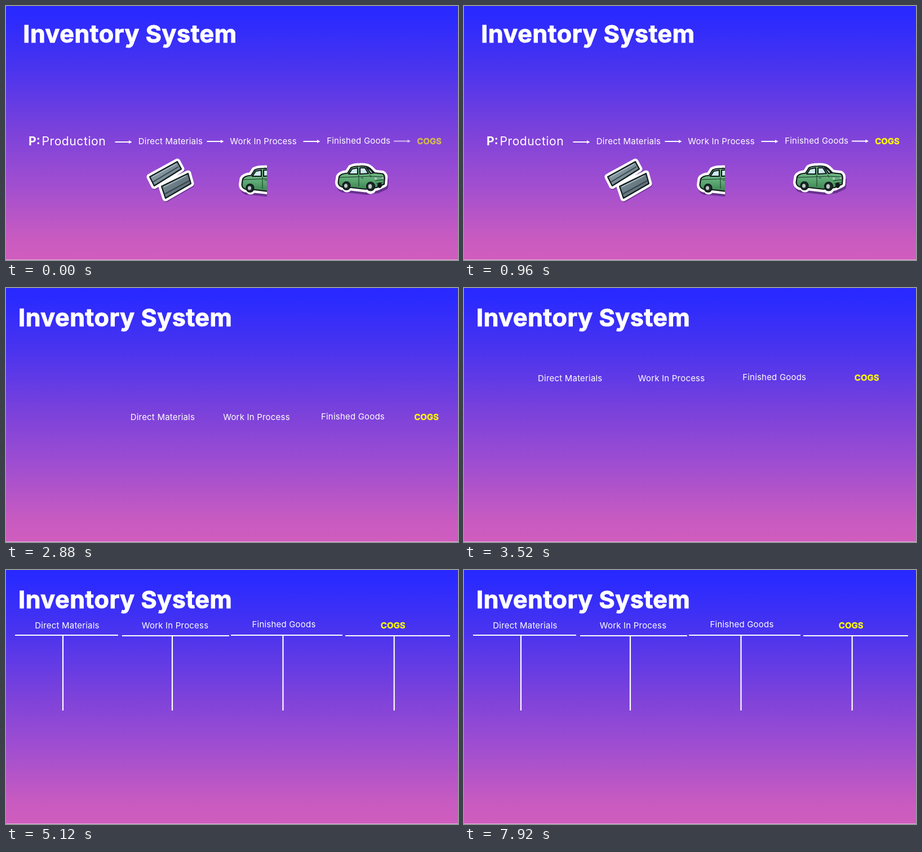
These frames come from a looping animation (802x452 px, 8 s). An HTML page:

```html
<!DOCTYPE html>
<html lang="en">
<head>
<meta charset="utf-8">
<title>Inventory System</title>
<style>
  html, body { margin: 0; width: 100%; height: 100%; overflow: hidden; background: #2829ff; }
  svg { display: block; width: 100%; height: 100%; }
  text { font-family: Inter, "Open Sans", sans-serif; font-size: 15px; fill: #fff; text-anchor: middle; }
  .label { letter-spacing: .2px; }
  .title { font-size: 43px; font-weight: 700; letter-spacing: .6px; stroke: #fff; stroke-width: 1.1; }
  .production { font-size: 21.2px; letter-spacing: .5px; text-anchor: start; }
  .bold { font-weight: 700; letter-spacing: 0; }
  .cogs { font-weight: 700; fill: #ff0; stroke: #ff0; stroke-width: .3; }
  .sticker { fill: #fff; stroke: #fff; stroke-width: 11; stroke-linejoin: round; }
  .shade { fill: #2c1450; stroke: #2c1450; stroke-width: 10; stroke-linejoin: round; opacity: .5; }
  .ink { stroke: #101a1c; stroke-width: 2.2; stroke-linejoin: round; }
  .thin { fill: none; stroke: #173424; stroke-width: 1; }
</style>
</head>
<body>
<svg viewBox="0 0 802 452" preserveAspectRatio="none">
  <defs>
    <linearGradient id="sky" x2="0" y2="1">
      <stop offset="0" stop-color="#2829ff"/>
      <stop offset=".04" stop-color="#2a2aff"/>
      <stop offset=".25" stop-color="#4b34ee"/>
      <stop offset=".5" stop-color="#7d42da"/>
      <stop offset=".7" stop-color="#a04ed0"/>
      <stop offset=".92" stop-color="#c95bc0"/>
      <stop offset="1" stop-color="#d05dbe"/>
    </linearGradient>
    <linearGradient id="steel" x2="1" y2="1">
      <stop offset="0" stop-color="#93a5ae"/>
      <stop offset=".5" stop-color="#74868f"/>
      <stop offset="1" stop-color="#4d5d67"/>
    </linearGradient>
    <linearGradient id="paint" x2="0" y2="1">
      <stop offset="0" stop-color="#86c596"/>
      <stop offset=".6" stop-color="#5ca873"/>
      <stop offset="1" stop-color="#3c8450"/>
    </linearGradient>
    <path id="body" d="M589.5 314L591 304Q594 298 606 297.5L612 288Q617 285 628 285Q641 284.5 646 289L654 297L668 298.5Q673 301 671.5 310L671 317L658 323L638 326L612 323L596 322Q590 320 589.5 314Z"/>
    <path id="bars" d="M255 304L304 277L311 290L263 320ZM276 321L323 298L328 316L283 342Z"/>
    <g id="car">
      <use href="#body" class="shade" x="2" y="5"/>
      <g class="sticker">
        <use href="#body"/>
        <ellipse cx="605" cy="321" rx="4" ry="5"/>
        <ellipse cx="647" cy="323" rx="5" ry="6"/>
      </g>
      <use href="#body" class="ink" fill="url(#paint)"/>
      <path class="ink" fill="#cdebed" d="M608 299L614 290L624 288V299ZM628 288H637L643 298L628 299ZM640 288L645 290L652 297L647 298Z"/>
      <path class="thin" d="M592 305L647 303L670 304M626 300V321M645 300L648 305M655 311L670 309M657 316L669 314M630 306H634"/>
      <ellipse cx="663" cy="319" rx="4" ry="5" fill="#111a1a"/>
      <g class="ink" fill="#202a2a">
        <ellipse cx="604" cy="320" rx="6.5" ry="7"/>
        <ellipse cx="647" cy="321" rx="7" ry="7.5"/>
      </g>
      <g fill="#bdc9c6">
        <ellipse cx="603" cy="320" rx="3" ry="3.6"/>
        <ellipse cx="646" cy="321" rx="3.2" ry="4"/>
        <circle cx="656" cy="307" r="2"/>
        <circle cx="668" cy="306" r="1.6"/>
      </g>
    </g>
    <clipPath id="half"><path d="M400 270H463V350H400Z"/></clipPath>
  </defs>

  <path fill="url(#sky)" d="M0 0H802V452H0Z"/>
  <path fill="#fff" opacity=".5" d="M0 451H802V452H0Z"/>

  <text id="title" class="title">Inventory System</text>

  <g id="intro">
    <text class="production bold" x="40" y="248">P:</text>
    <text class="production" x="63.5" y="248">Production</text>
  </g>

  <g id="flow">
    <g>
      <use href="#bars" class="shade" x="1" y="2"/>
      <use href="#bars" class="sticker"/>
      <use href="#bars" class="ink" fill="url(#steel)"/>
      <path fill="none" stroke="#38464e" stroke-width="2" d="M261 313L306 286M281 335L325 311"/>
      <path fill="none" stroke="#a9b9c0" stroke-width="1.5" d="M260 304L302 281M280 322L320 302"/>
    </g>
    <g clip-path="url(#half)"><use href="#car" x="-171" y="4"/></g>
    <use href="#car"/>
  </g>

  <g id="labels"></g>
  <g id="accounts" fill="none" stroke="#fff" stroke-width="2.2"></g>
</svg>
<script>
  const LOOP = 8000;
  const NS = "http://www.w3.org/2000/svg";
  const byId = id => document.getElementById(id);

  function add(parent, tag, attrs, text) {
    const el = document.createElementNS(NS, tag);
    for (const key in attrs) el.setAttribute(key, attrs[key]);
    if (text) el.textContent = text;
    return parent.appendChild(el);
  }

  const clamp = v => Math.min(1, Math.max(0, v));
  const span = (t, from, to) => clamp((t - from) / (to - from));
  const ease = p => (1 - Math.cos(Math.PI * p)) / 2;
  const mix = (a, b, p) => a + (b - a) * p;
  const place = (el, x, y) => el.setAttribute("transform", `translate(${x.toFixed(2)} ${y.toFixed(2)})`);
  const fade = (el, v) => el.setAttribute("opacity", v.toFixed(3));

  const title = byId("title"), intro = byId("intro"), flow = byId("flow"), accounts = byId("accounts");

  // Each label: text, start centre and baseline, end centre and baseline
  const labels = [
    ["Direct Materials", 292, 246.2, 108.5, 104.2],
    ["Work In Process", 456.5, 245.5, 300, 104.2],
    ["Finished Goods", 625.7, 245.3, 493, 102.2],
    ["COGS", 751, 245.6, 686.7, 103.6]
  ].map(([text, x0, y0, x1, y1]) => {
    const el = add(byId("labels"), "text", { class: text === "COGS" ? "cogs" : "label" }, text);
    return { el, x0, y0, x1, y1 };
  });
  const cogs = labels[3].el;

  function arrow(parent, x, y) {
    const g = add(parent, "g", { transform: `translate(${x} ${y})` });
    add(g, "path", { d: "M0 0H26", stroke: "#fff", "stroke-width": 2 });
    add(g, "path", { d: "M24.5 -3L30 0L24.5 3Z", fill: "#fff" });
    return g;
  }
  arrow(intro, 193.5, 242);
  arrow(flow, 356.5, 241);
  arrow(flow, 527.5, 241);
  const lastArrow = arrow(flow, 688, 240.5);

  // Each account: left, right, bar height, stem position
  for (const [left, right, y, stem] of [
    [16, 199, 116, 101], [206, 396, 117, 295], [399, 597, 116, 491.5], [602, 788, 117, 688.7]
  ]) add(accounts, "path", { d: `M${left} ${y}H${right}M${stem} ${y}V250` });

  function draw(t) {
    const shift = ease(span(t, 960, 1720));
    place(title, mix(220, 211.7, shift), mix(65, 68, shift));
    fade(intro, 1 - span(t, 960, 1440));

    const arrive = mix(.65, 1, span(t, 0, 240));
    fade(cogs, arrive);
    fade(lastArrow, arrive);

    fade(flow, 1 - span(t, 2480, 2840));
    const move = ease(span(t, 2565, 4330));
    for (const { el, x0, y0, x1, y1 } of labels) place(el, mix(x0, x1, move), mix(y0, y1, move));

    fade(accounts, span(t, 4320, 4720));
  }

  const start = performance.now();
  function tick() {
    draw((performance.now() - start) % LOOP);
    requestAnimationFrame(tick);
  }
  draw(0);
  requestAnimationFrame(tick);
</script>
</body>
</html>
```
